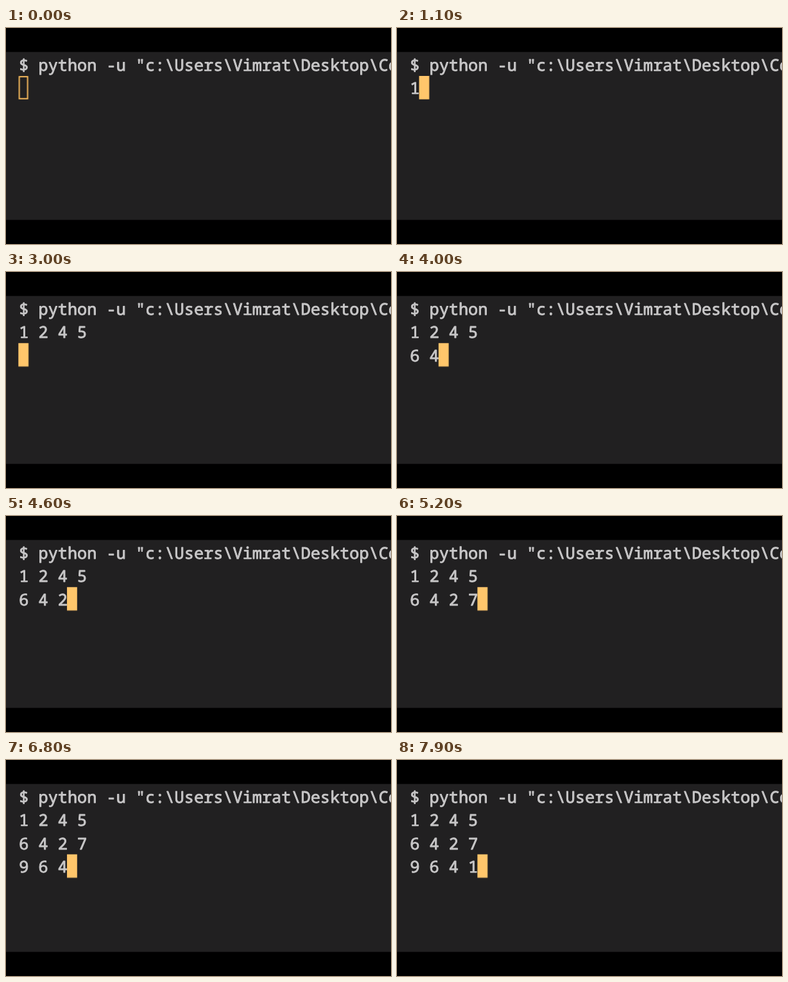
Write an HTML page that moves like this. It is 600 px wide and 338 px high and loops after 8 s.

```html
<!DOCTYPE html>
<html lang="en">
<head>
<meta charset="utf-8">
<title>Terminal input</title>
<style>
  html, body { margin: 0; width: 100%; height: 100%; overflow: hidden; background: #000; }
  svg { display: block; width: 100%; height: 100%; }
  text {
    font: 500 25.25px "Noto Sans Mono", "DejaVu Sans Mono", monospace;
    font-variant-ligatures: none;
    text-rendering: geometricPrecision;
    white-space: pre;
    fill: #c8c7c8;
    stroke: #c8c7c8;
    stroke-width: 0.9;
    stroke-linejoin: round;
  }
  #block { fill: #ffc66b; animation: focus 8s step-end infinite; }
  #frame { fill: none; stroke: #f5b95c; stroke-width: 2; animation: blur 8s step-end infinite; }
  /* the terminal gains focus after 100 ms */
  @keyframes focus { 0% { opacity: 0; } 1.25%, 100% { opacity: 1; } }
  @keyframes blur { 0% { opacity: 1; } 1.25%, 100% { opacity: 0; } }
</style>
</head>
<body>
<svg viewBox="0 0 600 338">
  <rect width="600" height="338" fill="#000"/>
  <rect y="37.5" width="600" height="262.8" fill="#212021"/>
  <text x="20.2" y="66.9">$ python -u "c:\Users\Vimrat\Desktop\Code\</text>
  <text class="row" x="20.2" y="103.2"></text>
  <text class="row" x="20.2" y="139.5"></text>
  <text class="row" x="20.2" y="175.8"></text>
  <g id="cursor">
    <rect id="block" width="15.8" height="36.6"/>
    <rect id="frame" x="1.4" y="1.2" width="13" height="34.4"/>
  </g>
</svg>
<script>
  const LOOP = 8000;
  const LEFT = 19.3, TOP = 75, CELL_W = 15.15, CELL_H = 36.3;

  // Each typed line and the time of every key press, in ms
  const keys = "1 2 4 5\n6 4 2 7\n9 6 4 1";
  const times = [
    1100, 1300, 1400, 1600, 2100, 2200, 2300, 3000,
    3400, 3600, 3900, 4100, 4500, 4700, 5200, 5600,
    5900, 6200, 6300, 6500, 6800, 7500, 7700
  ];

  const rows = document.querySelectorAll(".row");
  const cursor = document.getElementById("cursor");
  let shown = -1;

  function draw(count) {
    const lines = keys.slice(0, count).split("\n");
    rows.forEach((row, i) => { row.textContent = lines[i] || ""; });
    const line = lines.length - 1;
    const x = LEFT + lines[line].length * CELL_W;
    const y = TOP + line * CELL_H;
    cursor.setAttribute("transform", `translate(${x} ${y})`);
  }

  function tick() {
    const now = document.timeline.currentTime ?? performance.now();
    const start = cursor.firstElementChild.getAnimations()[0]?.startTime ?? 0;
    const t = Math.max(0, now - start) % LOOP;
    const count = times.filter(time => time <= t).length;
    if (count !== shown) draw(shown = count);
    requestAnimationFrame(tick);
  }

  draw(0);
  requestAnimationFrame(tick);
</script>
</body>
</html>
```
